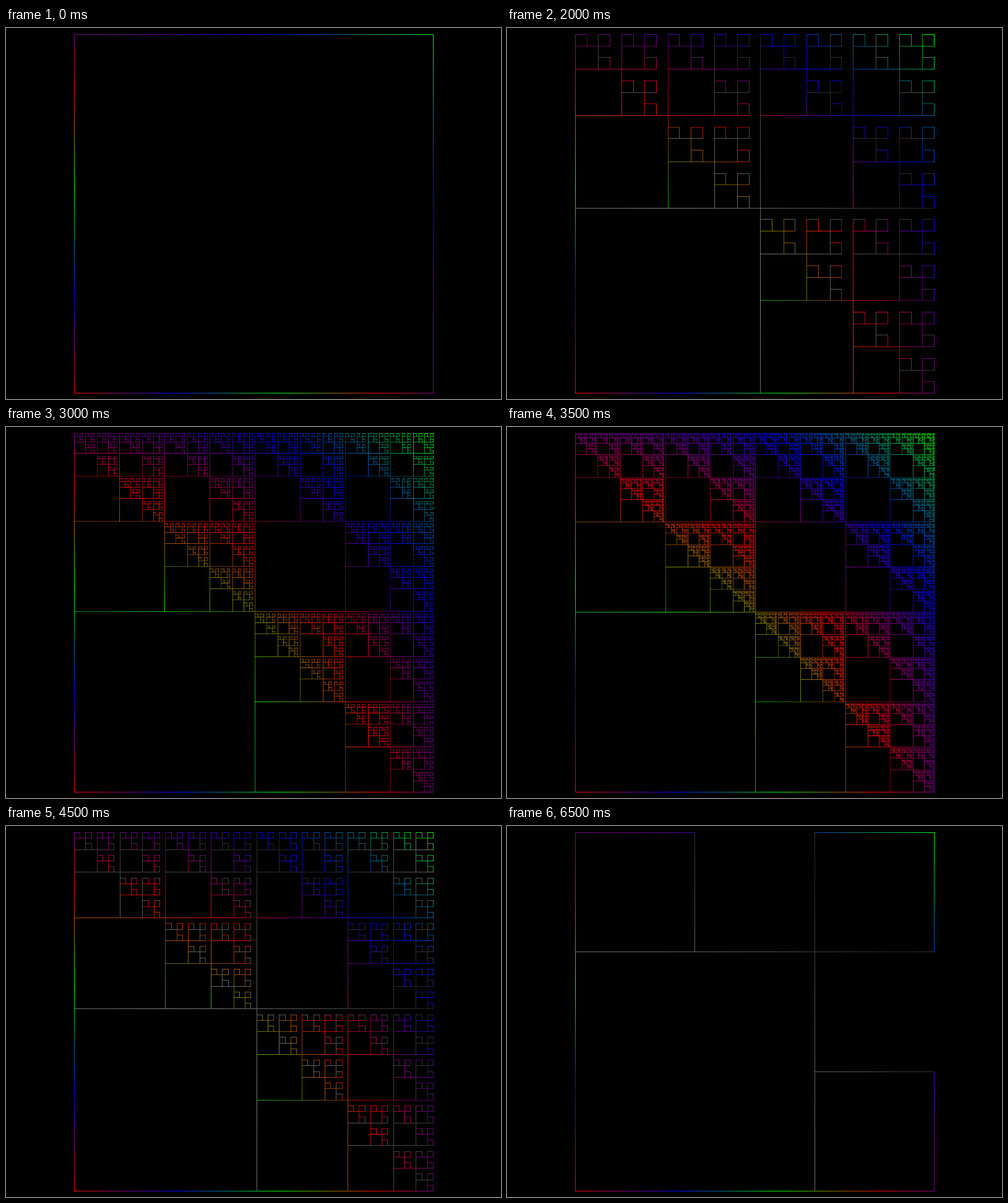
These frames come from a looping animation (800x600 px, 7 s). An HTML page with a canvas:

```html
<!DOCTYPE html>
<html lang="en">
<head>
<meta charset="utf-8">
<title>Recursive squares</title>
<style>
  html, body { margin: 0; width: 100%; height: 100%; overflow: hidden; background: #000; }
  canvas { display: block; }
</style>
</head>
<body>
<canvas id="stage" width="800" height="600"></canvas>
<script>
const ctx = document.getElementById('stage').getContext('2d');
const LEFT = 110, TOP = 10, SIZE = 580;
const STEP_MS = 500, MAX_DEPTH = 7;

// Rings of colour spreading from the lower left corner to the upper right one.
function rings(colors) {
  const x = LEFT + 0.5, y = TOP + SIZE + 0.5;
  const gradient = ctx.createRadialGradient(x, y, 0, x, y, SIZE * Math.SQRT2);
  colors.forEach((color, i) => gradient.addColorStop(i / (colors.length - 1), color));
  return gradient;
}

const red = '#f00', blue = '#00f', green = '#0f0';
const vivid = rings([red, blue, green, red, blue, green]);
const darkRed = '#505050', darkBlue = '#222', darkGreen = '#7d7d7d';
const muted = rings([darkRed, darkBlue, darkGreen, darkRed, darkBlue, darkGreen]);

function drawFigure(depth) {
  const unit = SIZE / (2 ** (depth + 1) - 1);

  // Lines far from the pixel grid lose their colour in the coarser figures.
  function setInk(position) {
    const offset = Math.abs(position - Math.round(position));
    const gray = depth < 6 && offset > 0.325;
    ctx.fillStyle = gray ? muted : vivid;
    ctx.globalAlpha = gray ? 1 : 1 - offset;
  }

  function horizontal(x, y, length) {
    const py = TOP + y * unit;
    const start = Math.round(LEFT + x * unit);
    const end = Math.round(LEFT + (x + length) * unit);
    setInk(py);
    ctx.fillRect(start, Math.round(py), end - start + 1, 1);
  }

  function vertical(x, y, length) {
    const px = LEFT + x * unit;
    const start = Math.round(TOP + y * unit);
    const end = Math.round(TOP + (y + length) * unit);
    setInk(px);
    ctx.fillRect(Math.round(px), start, 1, end - start + 1);
  }

  function squares(level, x, y) {
    if (level === 0) {
      horizontal(x, y, 1);
      horizontal(x, y + 1, 1);
      vertical(x, y, 1);
      vertical(x + 1, y, 1);
      return;
    }
    const part = 2 ** level - 1;
    const far = part + 1;
    vertical(x, y + part, far);
    horizontal(x, y + part + far, far);
    horizontal(x + part, y + part, 1);
    vertical(x + far, y + part, 1);
    squares(level - 1, x, y);
    squares(level - 1, x + far, y);
    squares(level - 1, x + far, y + far);
  }

  ctx.globalAlpha = 1;
  ctx.fillStyle = '#000';
  ctx.fillRect(0, 0, 800, 600);
  squares(depth, 0, 0);
}

let shown = -1;
function frame() {
  const step = Math.floor(performance.now() / STEP_MS) % (2 * MAX_DEPTH);
  const depth = MAX_DEPTH - Math.abs(MAX_DEPTH - step);
  if (depth !== shown) {
    drawFigure(depth);
    shown = depth;
  }
  requestAnimationFrame(frame);
}
frame();
</script>
</body>
</html>
```
